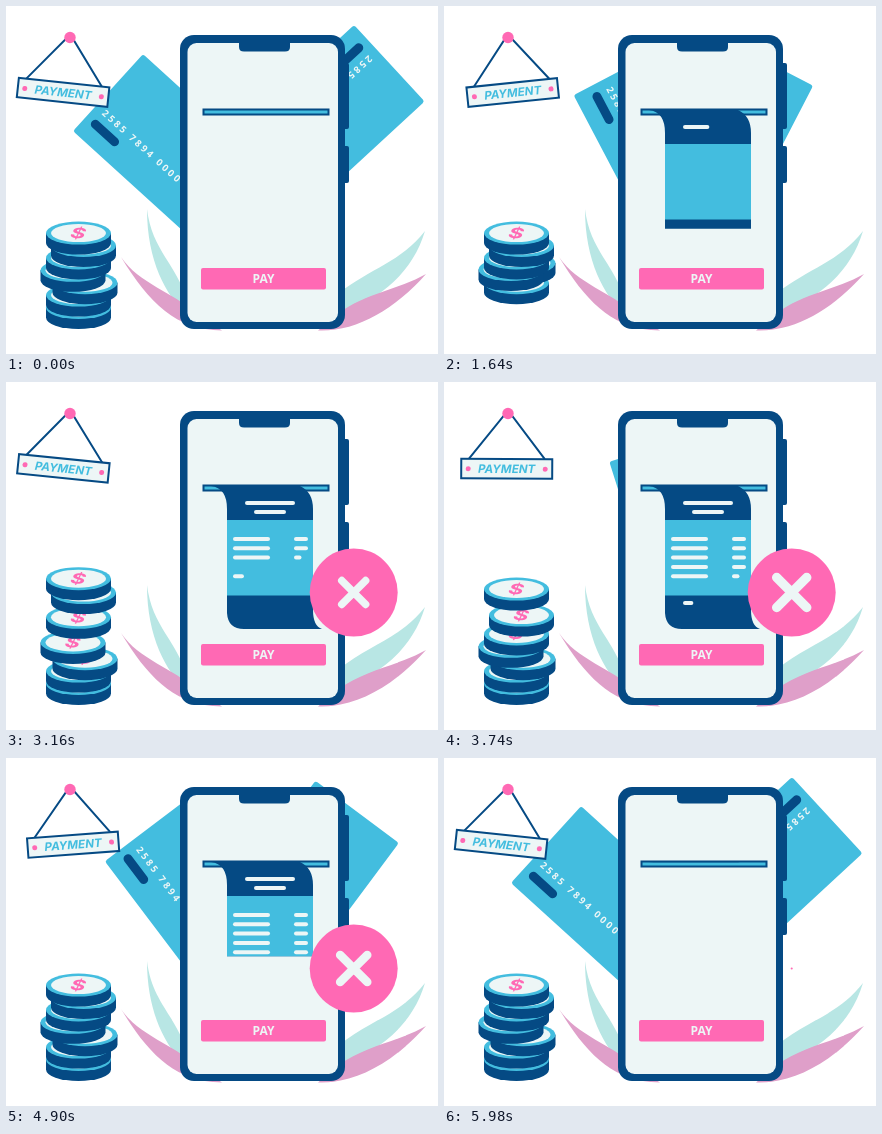
An HTML page that plays this animation: 432x348 px, repeating every 6.02 s.

```html
<!DOCTYPE html>
<html lang="en">
<head>
<meta charset="utf-8">
<title>Mobile payment</title>
<style>
  html, body { margin: 0; width: 100%; height: 100%; overflow: hidden; background: #fff; }
  svg { display: block; width: 432px; height: 348px; }
  .navy { fill: #054a84; }
  .sky { fill: #43bddf; }
  .paper { fill: #edf6f6; }
  .pink { fill: #ff69b4; }
  .ink { stroke: #054a84; stroke-width: 2; }
  .rule { stroke: #edf6f6; stroke-width: 4; stroke-linecap: round; }
  text { text-anchor: middle; font-weight: 700; }
  .pay { font: 700 12px "Open Sans", "Noto Sans", sans-serif; }
  .sign { font: italic 700 11.6px Inter, sans-serif; }
  .number { font: 700 9.5px "Open Sans", "Noto Sans", sans-serif; letter-spacing: 2.45px; text-anchor: start; }
  .dollar { font: 700 17px Inter, sans-serif; }
</style>
</head>
<body>
<svg viewBox="0 0 432 348">
  <defs>
    <g id="card">
      <rect class="sky" y="-104" width="165" height="104" rx="2.5"/>
      <path d="M12 -20H38" stroke="#054a84" stroke-width="9" stroke-linecap="round"/>
      <text class="number paper" x="9.6" y="-31.6">2585 7894 0000</text>
    </g>
    <g id="coin">
      <path class="navy" d="M-32.5 0V10A32.5 11.5 0 0 0 32.5 10V0Z"/>
      <ellipse class="sky" rx="32.5" ry="11.5"/>
      <ellipse class="paper" rx="27.5" ry="9"/>
      <text class="dollar pink" transform="matrix(1.35 .14 -.4 .82 0 0)" y="6">$</text>
    </g>
    <clipPath id="slip"><rect id="slipRect" x="195" y="104" width="130" height="0"/></clipPath>
  </defs>

  <use id="leftCard" href="#card"/>
  <use id="rightCard" href="#card"/>

  <g fill="#b8e6e4">
    <path d="M141 203C146 245 171 258 181 295V308C160 290 141 255 141 203Z"/>
    <path d="M419 225C395 256 365 262 333 287V308C377 292 407 265 419 225Z"/>
  </g>
  <g fill="#df9fc9">
    <path d="M115 251C133 278 168 286 190 308L216 324.500C170 324 143 297 115 251Z"/>
    <path d="M420 268C392 284 360 287 333 307L312 324.500C350 326 388 304 420 268Z"/>
  </g>

  <g class="navy">
    <rect x="334" y="57" width="9" height="66" rx="2"/>
    <rect x="334" y="140" width="9" height="37" rx="2"/>
    <rect x="174" y="29" width="165" height="294" rx="14"/>
  </g>
  <rect class="paper" x="181.500" y="37" width="150.500" height="279" rx="9"/>
  <path class="navy" d="M233 36H284V41Q284 45.500 279 45.500H238Q233 45.500 233 41Z"/>
  <rect class="pink" x="195" y="262" width="125" height="21.500" rx="2"/>
  <text class="pay paper" x="257.500" y="276.500">PAY</text>

  <rect class="sky ink" x="197.500" y="103.500" width="125" height="5"/>
  <g clip-path="url(#slip)">
    <path class="navy" d="M205 104Q221 106 221 127V231Q222 247 238 247H316Q307 244 307 228V127Q307 110 294 104Z"/>
    <rect class="sky" x="221" y="138" width="86" height="75.500"/>
    <g id="rules"></g>
  </g>

  <g id="badge">
    <circle class="pink" r="44"/>
    <path id="cross" d="M-15 -15L15 15M15 -15L-15 15" stroke="#edf6f6" stroke-width="9.500" stroke-linecap="round"/>
  </g>

  <g id="coins"></g>

  <g id="sign">
    <path class="ink" fill="none" d="M25 77L62 31H66L101 77"/>
    <rect class="paper ink" x="17.500" y="77" width="91" height="19.500"/>
    <circle class="pink" cx="24.500" cy="87" r="2.500"/>
    <circle class="pink" cx="101.500" cy="87" r="2.500"/>
    <text class="sign sky" x="63" y="91">PAYMENT</text>
  </g>
  <circle class="pink" cx="64" cy="31.500" r="5.700"/>
</svg>
<script>
const LOOP = 6020;
const $ = id => document.getElementById(id);
const clamp = x => Math.min(1, Math.max(0, x));
const ramp = (t, from, to) => clamp((t - from) / (to - from));
const ease = (t, from, to) => Math.sin(ramp(t, from, to) * Math.PI / 2) ** 2;
const place = (el, value) => el.setAttribute("transform", value);

function add(parent, name, attrs) {
  const el = document.createElementNS("http://www.w3.org/2000/svg", name);
  for (const key in attrs) el.setAttribute(key, attrs[key]);
  return parent.appendChild(el);
}

// Receipt lines, each written from left to right
const rules = [];
function addRule(x, y, length, start) {
  const el = add($("rules"), "line", { class: "rule", x1: x, y1: y, y2: y });
  rules.push({ el, x, length, start });
}
addRule(241, 121, 46, 1500);
addRule(250, 130, 28, 1800);
[0, 1, 2, 4, 3].forEach((row, i) => addRule(229, 157 + row * 9.3, 33, 2230 + i * 290));
for (let row = 0; row < 5; row++) addRule(290, 157 + row * 9.3, 10, 2480 + row * 290);
addRule(241, 221, 45, 3700);
addRule(250, 230, 26, 3950);

// Coins from the bottom up, hopping one after another
const coins = [72.5, 72.5, 79, 67, 72.5, 77.5, 72.5].map((x, i) => ({
  el: add($("coins"), "use", { href: "#coin" }),
  x, y: 301.5 - i * 12.4, peak: 1280 + i * 330
}));
const hop = (t, peak) => 32 * ease(t, peak - 700, peak) * (1 - ease(t, peak, peak + 1150));

function draw(t) {
  const turn = 35 * Math.sin(Math.PI * t / LOOP) ** 2;
  place($("leftCard"), `rotate(${turn} 200 285) translate(67 125) rotate(42.3)`);
  place($("rightCard"), `rotate(${-turn} 349 228) translate(348 19) rotate(137.3)`);

  place($("sign"), `rotate(${6.1 * Math.cos(4 * Math.PI * t / LOOP)} 64 31)`);

  const shown = ease(t, 0, 2430) - ease(t, 4045, LOOP);
  $("slipRect").setAttribute("height", Math.max(0, 156 * shown));
  for (const { el, x, length, start } of rules) {
    const p = ramp(t, start, start + 290);
    el.setAttribute("x2", x + length * p);
    el.setAttribute("visibility", p > 0 ? "visible" : "hidden");
  }

  const badge = ease(t, 2400, 3000) - ease(t, 5440, 6040);
  place($("badge"), `translate(347.700 210.500) scale(${badge})`);
  place($("cross"), `scale(${ease(t, 2860, 3290) - ease(t, 4800, 5300)})`);

  for (const { el, x, y, peak } of coins) place(el, `translate(${x} ${y - hop(t, peak)})`);
}

const begin = performance.now();
function tick() {
  draw((performance.now() - begin) % LOOP);
  requestAnimationFrame(tick);
}
tick();
</script>
</body>
</html>
```
